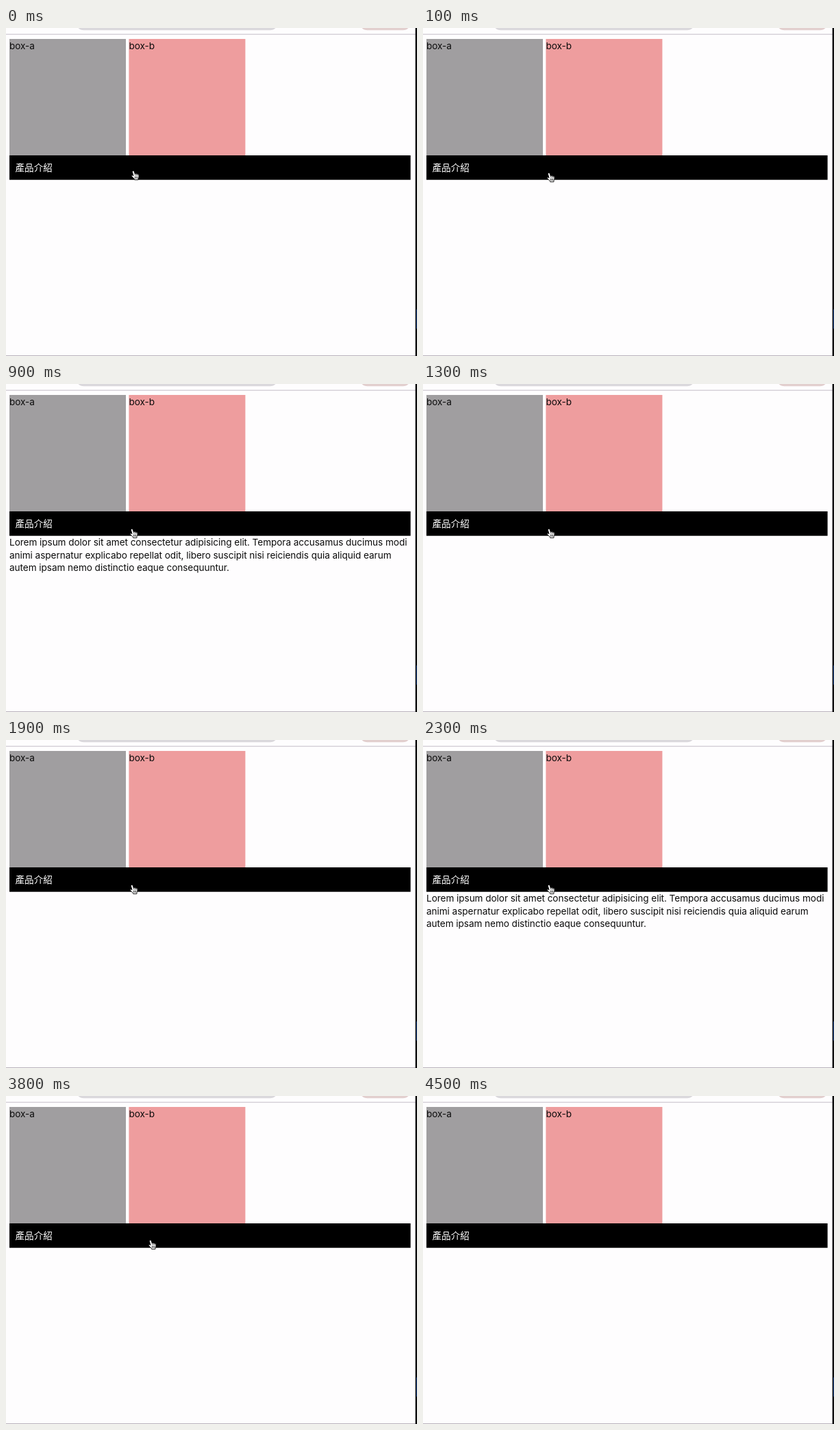
An HTML page that plays this animation: 600 by 479 pixels, repeating every 5100 ms.

```html
<!DOCTYPE html>
<html lang="zh-Hant">
<head>
<meta charset="utf-8">
<title>Toggle panel</title>
<style>
  html, body { margin: 0; width: 100%; height: 100%; overflow: hidden; background: #fefdfe; }
  svg { display: block; width: 600px; height: 479px; }
  text { font: 13.6px Inter, "Noto Sans", sans-serif; letter-spacing: -.06px; fill: #0b0b0b; }
  .title { font: 500 13.6px "Noto Sans CJK TC", "Noto Sans CJK", sans-serif; letter-spacing: 0; fill: #fff; }

  .panel, .hand, .arrow { animation: 5.1s step-end infinite; }
  .panel { animation-name: toggle; }
  .hand { animation-name: point; }
  .arrow { animation-name: leave; }

  @keyframes toggle {
    0% { visibility: hidden; }
    9.8% { visibility: visible; }
    25.49% { visibility: hidden; }
    45.09% { visibility: visible; }
    74.5%, 100% { visibility: hidden; }
  }
  @keyframes point {
    0% { transform: translate(183px, 208px); }
    1.96% { transform: translate(181px, 211px); }
    56.86% { transform: translate(186px, 211px); }
    58.82% { transform: translate(200px, 210px); }
    60.78% { transform: translate(208px, 210px); visibility: visible; }
    82.35% { transform: translate(210px, 204px); visibility: visible; }
    84.31%, 100% { transform: translate(210px, 204px); visibility: hidden; }
  }
  @keyframes leave {
    0% { transform: translate(222px, 110px); visibility: hidden; }
    84.31% { transform: translate(222px, 110px); visibility: visible; }
    86.27% { transform: translate(232px, 9px); visibility: visible; }
    88.23%, 100% { transform: translate(232px, 9px); visibility: hidden; }
  }
</style>
</head>
<body>
<svg viewBox="0 0 600 479">
  <rect width="600" height="479" fill="#fefdfe"/>

  <!-- browser edges -->
  <rect x="102" y="-20" width="295" height="23.3" rx="11.6" fill="#dad8dc"/>
  <rect x="516" y="-20" width="75" height="23.3" rx="11.6" fill="#e2cfce"/>
  <rect y="8.6" width="598" height="1.2" fill="#cdc7d0"/>
  <rect y="478" width="598" height="1" fill="#b9b3bc"/>
  <rect x="597.6" width="2.4" height="479" fill="#0c0c0e"/>
  <rect x="599" y="411" width="1" height="28" fill="#1c4385"/>

  <!-- page -->
  <rect x="5" y="16" width="170" height="170" fill="#a09ea0"/>
  <rect x="179.4" y="16" width="170" height="170" fill="#ee9d9e"/>
  <text x="5" y="30.5">box-a</text>
  <text x="179.4" y="30.5">box-b</text>
  <rect x="5" y="186" width="585.6" height="35.7" fill="#000"/>
  <text class="title" x="13.5" y="208.8">產品介紹</text>
  <g class="panel">
    <text x="5" y="236">Lorem ipsum dolor sit amet consectetur adipisicing elit. Tempora accusamus ducimus modi</text>
    <text x="5" y="254.7">animi aspernatur explicabo repellat odit, libero suscipit nisi reiciendis quia aliquid earum</text>
    <text x="5" y="273.4">autem ipsam nemo distinctio eaque consequuntur.</text>
  </g>

  <!-- pointers -->
  <g class="hand" stroke="#000" stroke-linejoin="round" stroke-linecap="round">
    <path stroke-width=".9" fill="#fff" d="M2.1.7C3 .3 3.8.7 4.1 1.5L5.3 5C5.8 4.2 7 4.2 7.4 5.1C8 4.5 9 4.7 9.3 5.7C10.2 5.2 11 5.9 11 6.9C11.1 9 10.7 10.2 10.1 11.4L9.9 13.7H4.7L4.3 12.4C3 11.4 1.9 10 .5 8.5C-.1 7.5 1.2 6.6 2 7.2L3 8L1.4 2.2C1.2 1.5 1.5 1 2.1.7Z"/>
    <path stroke-width=".7" fill="none" d="M5.3 5.2L5.7 7M7.4 5.3L7.6 7M9.3 5.8V7.2M5.3 9V11.6M7 9V11.6M8.7 9V11.6"/>
  </g>
  <path class="arrow" fill="#000" stroke="#fff" stroke-width=".9" stroke-linejoin="round"
        d="M.5.5V12.2L3.2 9.7L4.9 13.7L6.8 12.9L5.1 9H8.8Z"/>
</svg>
</body>
</html>
```
